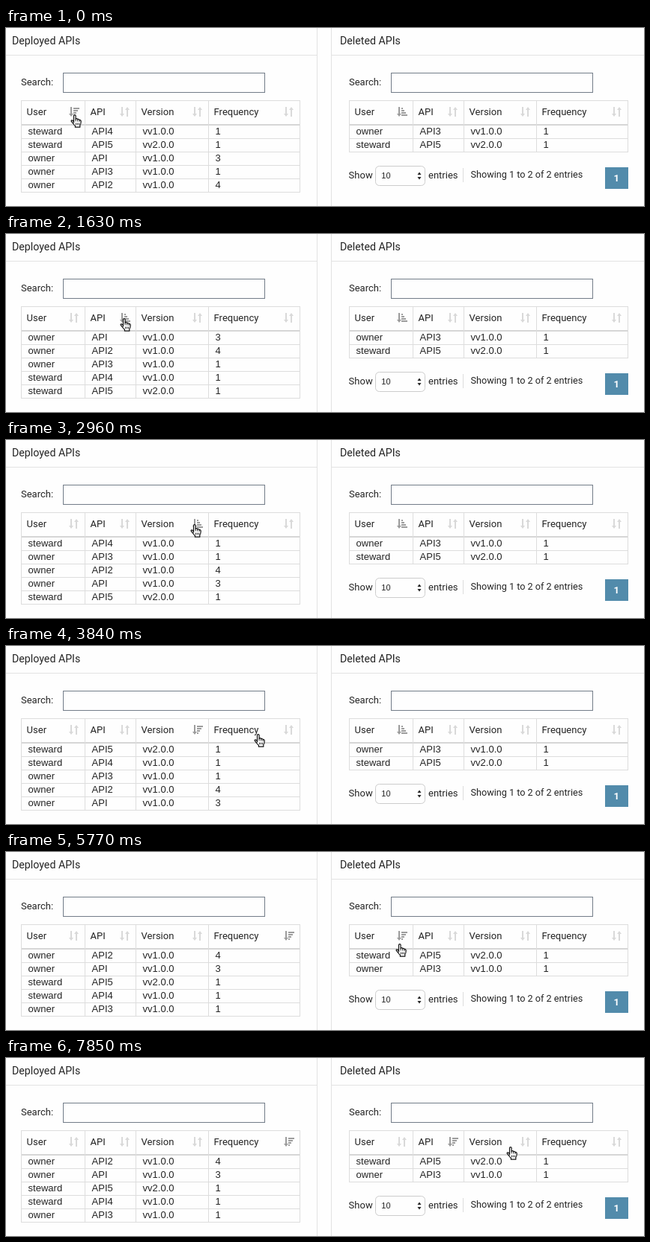
An HTML page with a canvas for the animation above (7990 ms loop, 852 px wide and 239 px high).

```html
<!DOCTYPE html>
<html lang="en">
<head>
<meta charset="utf-8">
<title>API usage tables</title>
<style>
  html, body { margin: 0; width: 100%; height: 100%; overflow: hidden; background: #fefefe; }
  canvas { display: block; }
</style>
</head>
<body>
<canvas id="stage" width="852" height="239"></canvas>
<script>
const ctx = document.getElementById('stage').getContext('2d');
const LOOP = 7990, STEPS = 54;
const UI = 'Roboto, sans-serif';
const ARIAL = '"Liberation Sans", Arial, sans-serif';
const INK = '#242424', LINE = '#ddd', PALE = '#d9d9d9', GRAY = '#9c9c9c';
const HEADS = ['User', 'API', 'Version', 'Frequency'];
const COLS = [20, 105, 173, 270, 392];
const TOP = 130, ROW = 18, OFFSET = 438;

const deployed = {
  col: 0, dir: -1,
  rows: [
    ['steward', 'API4', 'vv1.0.0', 1],
    ['steward', 'API5', 'vv2.0.0', 1],
    ['owner', 'API', 'vv1.0.0', 3],
    ['owner', 'API3', 'vv1.0.0', 1],
    ['owner', 'API2', 'vv1.0.0', 4]
  ]
};
const deleted = { col: 0, dir: 1, rows: [deployed.rows[3], deployed.rows[1]] };

// The pointer glides to each stop, then clicks a heading; times are in steps.
const STOPS = [
  { from: 0, to: 0, x: 86, y: 116, ease: 1, table: 0, col: 0, clicks: [3] },
  { from: 5, to: 8, x: 152, y: 113, ease: 2.3, table: 0, col: 1, clicks: [11, 14] },
  { from: 15, to: 19, x: 246, y: 113, ease: 3.2, table: 0, col: 2, clicks: [20, 22] },
  { from: 24, to: 28, x: 367, y: 120, ease: 2.4, table: 0, col: 3, clicks: [30, 31] },
  { from: 33, to: 37, x: 520, y: 123, ease: 5, table: 1, col: 0, clicks: [39, 40] },
  { from: 42, to: 47, x: 602, y: 121, ease: 3, table: 1, col: 1, clicks: [49, 50] },
  { from: 51, to: 53, x: 668, y: 119, ease: 2, clicks: [] }
];

function sortBy(table, col) {
  const dir = table.col === col ? -table.dir : 1;
  const rows = [...table.rows].sort((a, b) =>
    dir * (a[col] < b[col] ? -1 : a[col] > b[col] ? 1 : 0));
  return { col, dir, rows };
}

function stateAt(step) {
  const tables = [deployed, deleted];
  let { x, y } = STOPS[0];
  for (const stop of STOPS) {
    if (step < stop.from) break;
    const u = Math.min(1, (step - stop.from + 1) / (stop.to - stop.from + 1));
    const k = 1 - (1 - u) ** stop.ease;
    x += (stop.x - x) * k;
    y += (stop.y - y) * k;
    for (const click of stop.clicks) {
      if (click <= step) tables[stop.table] = sortBy(tables[stop.table], stop.col);
    }
  }
  return { tables, x: Math.round(x), y: Math.round(y) };
}

function rect(x, y, w, h, color) {
  ctx.fillStyle = color;
  ctx.fillRect(x, y, w, h);
}

function text(str, x, y, font = '13px ' + UI, color = INK) {
  ctx.font = font;
  ctx.fillStyle = color;
  ctx.fillText(str, x, y);
}

// Triangle with its base centred on x, y; negative height points up.
function triangle(x, y, half, height, color) {
  ctx.fillStyle = color;
  ctx.beginPath();
  ctx.moveTo(x - half, y);
  ctx.lineTo(x, y + height);
  ctx.lineTo(x + half, y);
  ctx.fill();
}

function arrow(x, y, up, color) {
  rect(x - 1, up ? y + 3 : y, 2, 10, color);
  triangle(x, up ? y + 4 : y + 9, 3, up ? -4 : 4, color);
}

function sortIcon(right, dir) {
  const x = right - 18, y = 106;
  arrow(x, y, false, dir ? GRAY : PALE);
  if (!dir) {
    arrow(x + 7, y, true, PALE);
    return;
  }
  for (let i = 0; i < 4; i++) {
    rect(x + 3, y + 1 + i * 3, 2 + 2 * (dir > 0 ? i : 3 - i), 2, GRAY);
  }
}

function drawTable({ col, dir, rows }) {
  const left = COLS[0], width = COLS[4] - left + 1;
  const bottom = TOP + rows.length * ROW;
  rect(left, 97, width, 1, LINE);
  rect(left, TOP - 1, width, 2, '#d6d6d6');
  COLS.forEach(x => rect(x, 97, 1, bottom - 96, LINE));
  HEADS.forEach((head, i) => {
    text(head, COLS[i] + 7.6, 117);
    sortIcon(COLS[i + 1], i === col ? dir : 0);
  });
  rows.forEach((row, r) => {
    const y = TOP + r * ROW;
    rect(left, y + ROW, width, 1, LINE);
    row.forEach((value, i) => text(value, COLS[i] + 9.6, y + 13, '13px ' + ARIAL));
  });
}

function drawPanel(title, table) {
  text(title, 8, 22, '14.2px ' + UI);
  text('Search:', 20, 77);
  ctx.lineWidth = 1;
  ctx.strokeStyle = '#727c88';
  ctx.strokeRect(76.5, 60.5, 269, 26);
  drawTable(table);
}

function drawFooter() {
  text('Show', 457.6, 202);
  ctx.strokeStyle = '#ccc';
  ctx.beginPath();
  ctx.roundRect(493.5, 185.5, 66, 26, 5);
  ctx.stroke();
  text('10', 501.3, 202, '11px ' + ARIAL);
  triangle(552, 197, 2.5, -3.5, INK);
  triangle(552, 200, 2.5, 3.5, INK);
  text('entries', 564, 202);
  rect(610, 188, 1, 19, LINE);
  text('Showing 1 to 2 of 2 entries', 620.5, 201, '12.65px ' + UI);
  rect(800, 187, 31, 29, '#528bab');
  text('1', 811.5, 206, 'bold 13px ' + UI, '#fff');
}

const HAND = new Path2D(
  'M4.5 11 V2 Q4.5 .6 5.8 .6 Q7.1 .6 7.1 2 V6.6 Q7.4 5.5 8.5 5.7 Q9.6 5.8 9.7 7' +
  ' Q10.2 6.2 11.1 6.5 Q12 6.8 12.1 7.8 Q12.7 7.2 13.5 7.7 Q14.3 8.2 14.2 9.4' +
  ' L13.9 12 Q13.6 13.6 12.8 14.4 V17.2 H6.4 V15.3 Q4.5 13.8 3.5 12' +
  ' L1.2 9.2 Q.8 8 2 7.8 Q3 7.7 4.5 9.7 Z');
const FINGERS = new Path2D(
  'M7.1 6.5 V9.3 M9.7 7 V9.5 M12.1 7.8 V9.8 M7.5 11.6 V14.2 M9.5 11.6 V14.2 M11.5 11.6 V14.2');

function drawPointer(x, y) {
  ctx.save();
  ctx.translate(x, y);
  ctx.lineJoin = 'round';
  ctx.fillStyle = '#fff';
  ctx.strokeStyle = '#111';
  ctx.lineWidth = 1.2;
  ctx.fill(HAND);
  ctx.stroke(HAND);
  ctx.lineWidth = 0.9;
  ctx.stroke(FINGERS);
  ctx.restore();
}

function draw(t) {
  // The small offset absorbs step times rounded to 10 ms.
  const { tables, x, y } = stateAt(Math.floor(t / LOOP * STEPS + 0.04) % STEPS);
  rect(0, 0, 852, 239, '#fefefe');
  for (const [left, width, side] of [[0, 416, 415], [434, 418, 434]]) {
    rect(left, 36, width, 1, '#e2e2e2');
    rect(side, 0, 1, 239, '#e2e2e2');
  }
  drawPanel('Deployed APIs', tables[0]);
  ctx.save();
  ctx.translate(OFFSET, 0);
  drawPanel('Deleted APIs', tables[1]);
  ctx.restore();
  drawFooter();
  drawPointer(x, y);
}

const start = performance.now();
function tick() {
  draw((performance.now() - start) % LOOP);
  requestAnimationFrame(tick);
}
tick();
</script>
</body>
</html>
```
